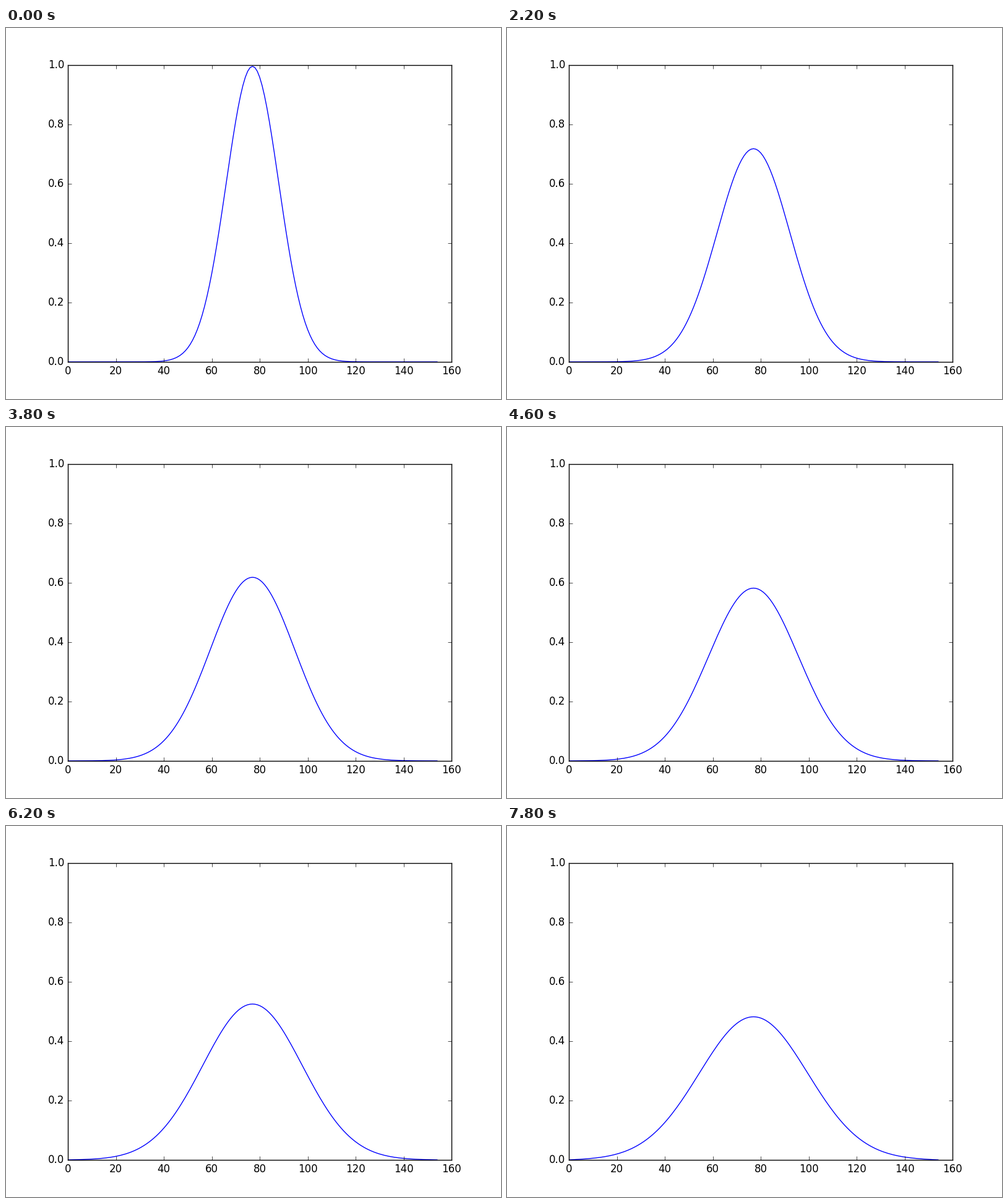
These frames come from a looping animation (800x600 px, 8000 ms). A matplotlib script:

```python
"""Heat diffusion of a Gaussian pulse on a rod with cold ends."""
import matplotlib.pyplot as plt
import numpy as np
from matplotlib.animation import FuncAnimation

FRAMES = 40
INTERVAL = 200          # ms
STEPS_PER_FRAME = 10
POINTS = 155
R = 0.5                 # diffusion number per step

plt.style.use("classic")
plt.rcParams.update({
    "figure.dpi": 100,
    "savefig.dpi": 100,
    "figure.facecolor": "white",
    "savefig.facecolor": "white",
    "font.family": "DejaVu Sans",
})


def step(u):
    """One explicit heat step; the end values stay fixed."""
    new = u.copy()
    new[1:-1] += R * (u[2:] - 2 * u[1:-1] + u[:-2])
    return new


def solve():
    x = np.linspace(-10, 10, POINTS)
    u = step(np.exp(-x**2 / 4))
    states = [u]
    for _ in range(FRAMES - 1):
        for _ in range(STEPS_PER_FRAME):
            u = step(u)
        states.append(u)
    return states


states = solve()

fig, ax = plt.subplots(figsize=(8, 6))
ax.set_xlim(0, 160)
ax.set_ylim(0, 1)
line, = ax.plot(np.arange(POINTS), states[0], color="#0000ff", lw=1)


def draw(i):
    line.set_ydata(states[i])
    return line,


anim = FuncAnimation(fig, draw, frames=FRAMES, init_func=lambda: draw(0),
                     interval=INTERVAL, repeat=True, repeat_delay=0)
plt.show()
```
